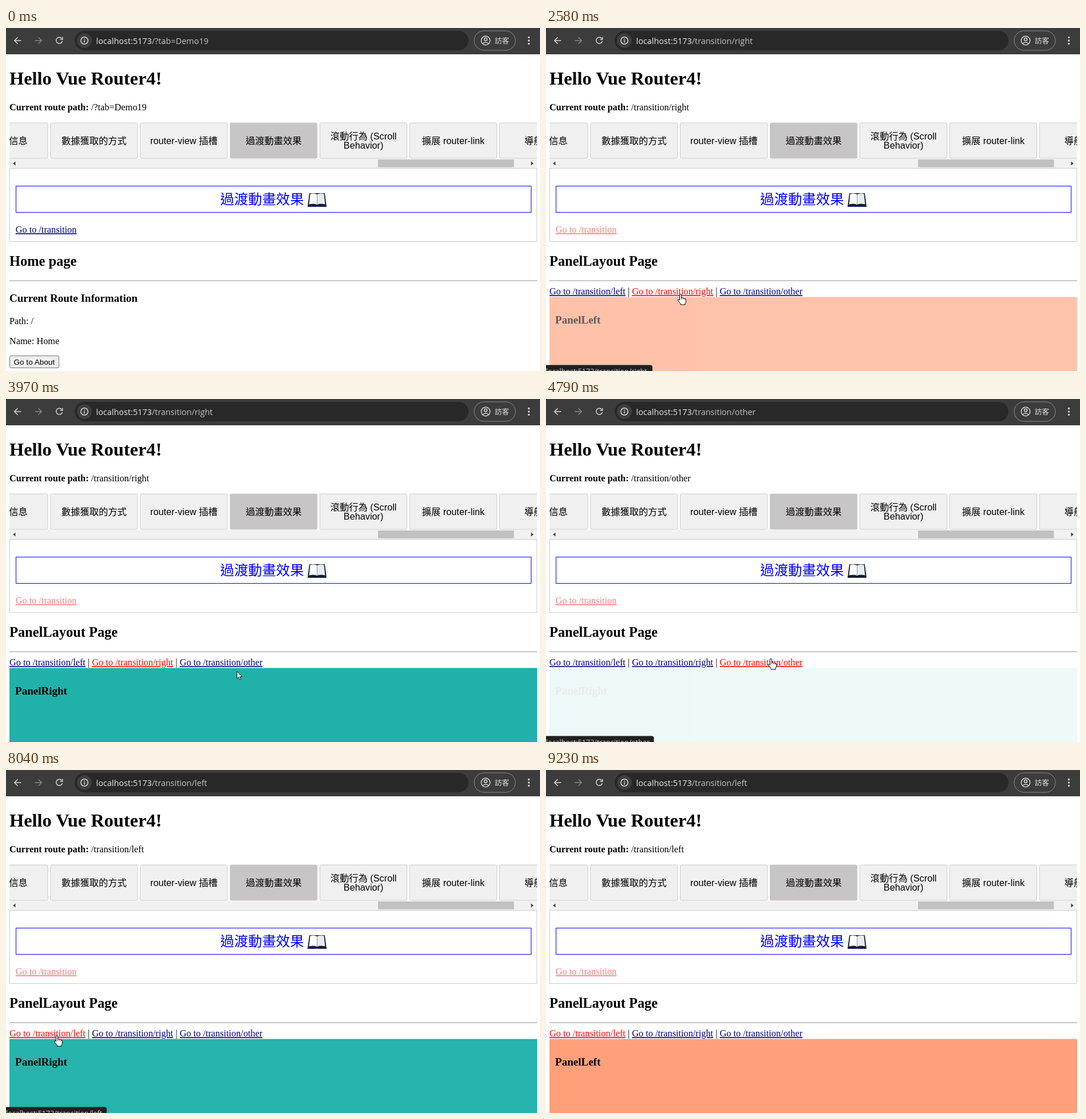
Recreate the animation shown at these times as an HTML page. Size 933 by 600 pixels, loop 9820 ms.

```html
<!DOCTYPE html>
<html lang="zh-Hant">
<head>
<meta charset="utf-8">
<title>Route transitions</title>
<style>
html, body { margin: 0; width: 100%; height: 100%; overflow: hidden; background: #fff; }
svg { display: block; width: 933px; height: 600px; }
text { white-space: pre; }
.serif { font: 16.28px "Liberation Serif", "Times New Roman", serif; }
.h1 { font-size: 32.4px; font-weight: bold; }
.h2 { font-size: 24.42px; font-weight: bold; }
.h3 { font-size: 19.05px; font-weight: bold; }
.b { font-weight: bold; }
.tab { font: 350 16.28px "Liberation Sans", "Noto Sans CJK TC", "Noto Sans CJK", sans-serif; text-anchor: middle; }
.title { font: 500 24.4px "Noto Sans CJK TC", "Noto Sans CJK", sans-serif; fill: #00f; }
.button { font: 13.57px "Liberation Sans", Arial, sans-serif; }
.url { font: 14.43px "Open Sans", "Noto Sans", sans-serif; fill: #e6e6e6; }
.status { font: 12.5px "Open Sans", "Noto Sans", sans-serif; fill: #c8c8c8; }
.guest { font: 12.5px "Noto Sans CJK TC", "Noto Sans CJK", sans-serif; fill: #e3e3e3; }
.link { text-decoration: underline; fill: #000080; }
</style>
</head>
<body>
<svg viewBox="0 0 933 600" xmlns="http://www.w3.org/2000/svg">
  <defs><clipPath id="strip"><rect x="6" y="160" width="922" height="90"/></clipPath></defs>
  <rect width="933" height="600" fill="#fff"/>

  <!-- browser bar -->
  <rect width="933" height="46" fill="#3c3c3c"/>
  <rect x="120" y="5" width="688" height="34" rx="17" fill="#282828"/>
  <g fill="none" stroke="#d6d6d6" stroke-width="1.5">
    <path d="M26.500 22H15M20.500 16.300L14.800 22L20.500 27.700"/>
    <path d="M50.500 22H62M56.500 16.300L62.200 22L56.500 27.700" stroke="#858585"/>
    <path d="M97.400 18.400A5.400 5.400 0 1 0 98.400 22.800M98.700 15.800V19.900H94.500"/>
    <circle cx="137" cy="22" r="13" fill="#3e3e3e" stroke="none"/>
    <circle cx="137" cy="22" r="6.200"/>
    <path d="M137 21.200V25.500M137 18.400V20"/>
    <rect x="818" y="5" width="72" height="34" rx="17" stroke="#8b8b8b" stroke-width="1"/>
    <circle cx="838" cy="22" r="7.700"/>
    <circle cx="838" cy="19.800" r="2.500"/>
    <path d="M832.700 27.300Q838 22.700 843.300 27.300"/>
  </g>
  <text class="guest" x="854" y="27.300">訪客</text>
  <g fill="#d6d6d6"><circle cx="913.500" cy="16.500" r="1.700"/><circle cx="913.500" cy="22" r="1.700"/><circle cx="913.500" cy="27.500" r="1.700"/></g>
  <text class="url" x="157.500" y="27.500">localhost:5173<tspan id="url" fill="#c4c4c4"></tspan></text>

  <!-- page head -->
  <text class="serif h1" x="6" y="98.800">Hello Vue Router4!</text>
  <text class="serif b" x="6" y="143.500">Current route path:</text>
  <text class="serif" id="path" x="148.800" y="143.500"></text>

  <g id="tabs" clip-path="url(#strip)"></g>
  <rect x="6" y="229" width="922" height="16.500" fill="#f1f1f1"/>
  <rect x="650" y="230" width="237.500" height="13.700" fill="#c1c1c1"/>
  <path d="M16.500 233.500V240.500L12 237ZM917.300 233.500V240.500L921.800 237Z" fill="#454545"/>

  <rect x="6.500" y="245.500" width="921" height="128" fill="none" stroke="#ccc"/>
  <rect x="17.500" y="276.500" width="900" height="46" fill="none" stroke="#00f"/>
  <text class="title" x="374.300" y="307.500">過渡動畫效果</text>
  <g>
    <path d="M530 289H557L560 312H527Z" fill="#14202c"/>
    <path d="M531.500 290Q539 288.500 543.500 291V309Q538 306.500 529.500 308.500Z" fill="#fff"/>
    <path d="M555.500 290Q548 288.500 543.500 291V309Q549 306.500 557.500 308.500Z" fill="#e6ecf0"/>
    <path d="M543.500 291V309" stroke="#8d98a0"/>
    <path d="M527 312H560" stroke="#0a0a50" stroke-width="1.500"/>
  </g>
  <text class="serif link" id="enter" x="16.700" y="358">Go to /transition</text>

  <text class="serif h2" id="heading" x="6" y="415.800"></text>
  <rect x="6" y="441.500" width="922" height="1" fill="#8f8f8f"/>

  <g id="home">
    <text class="serif h3" x="6" y="479.300">Current Route Information</text>
    <text class="serif" x="6" y="517.800">Path: /</text>
    <text class="serif" x="6" y="552.800">Name: Home</text>
    <rect x="6.500" y="573.500" width="86" height="21" rx="2.500" fill="#efefef" stroke="#767676"/>
    <text class="button" x="13.500" y="588.700">Go to About</text>
  </g>

  <g id="layout">
    <text class="serif" id="links" x="6" y="466.200"></text>
    <g id="panel">
      <rect id="fill" x="6" y="470.500" width="922" height="130"/>
      <text class="serif h3" id="name" x="16" y="517.300"></text>
    </g>
  </g>

  <g id="status">
    <path id="bubble" fill="#202020"/>
    <text class="status" id="target" x="0" y="605"></text>
  </g>

  <g id="cursor" stroke="#000" fill="#fff" stroke-linejoin="round">
    <path id="arrow" stroke-width="0.900" d="M0.500 0.500V13.200L3.400 10.500L5.300 15.200L7.400 14.300L5.500 9.800H9.500Z"/>
    <g id="hand" stroke-width="1">
      <path d="M-1.500 1.800Q-1.500 0.300 0 0.300T1.500 1.800V7Q3.400 5.800 4.400 7.500Q6.400 6.600 7.200 8.400Q9.500 8 9.500 10.400V13Q9.500 15.400 8 17V19H0.300V17.400Q-1.500 15.600 -4.300 11.500Q-4.800 9.500 -3 9.700L-1.500 11.200Z"/>
      <path d="M1.500 7V10M4.400 7.500V10M7.200 8.400V10.500" fill="none" stroke-width="0.800"/>
    </g>
  </g>
</svg>
<script>
const LOOP = 9820, FADE = 500;
const $ = id => document.getElementById(id);

// [click time, view]
const visits = [[1000, ''], [1640, 'left'], [2467, 'right'], [4457, 'other'], [6787, 'right'], [8018, 'left']];
const panels = {
  left: ['PanelLeft', '#ffa07a'],
  right: ['PanelRight', '#20b2aa'],
  other: ['PanelOther', '#ffffe0']
};
// [time, x, y] of the pointer tip
const route = [
  [260, 43, 468], [590, 43, 468], [850, 66, 350], [1250, 66, 350], [1530, 84, 460],
  [2100, 84, 460], [2350, 235, 465], [3690, 235, 465], [3900, 403, 476], [4130, 403, 476],
  [4330, 393, 454], [5150, 393, 454], [5450, 567, 355], [6070, 567, 355], [6700, 219, 455],
  [7780, 219, 455], [7970, 89, 464], [8640, 89, 464], [9150, 840, 590], [9225, 843, 602]
];
// [from, to, hovered view]
const hovers = [
  [800, 1440, ''], [1440, 2230, 'left'], [2230, 3790, 'right'],
  [4270, 5300, 'other'], [6740, 7930, 'right'], [7930, 8780, 'left']
];
const widths = { '': 144, left: 176, right: 186, other: 188.500 };

const clamp = v => Math.min(1, Math.max(0, v));
const smooth = v => v * v * (3 - 2 * v);
const address = view => '/transition' + (view && '/' + view);

// CSS "ease"
function ease(x) {
  if (x <= 0 || x >= 1) return clamp(x);
  let lo = 0, hi = 1, u = 0.5;
  for (let i = 0; i < 20; i++) {
    u = (lo + hi) / 2;
    const bx = 0.75 * u * (1 - u) + u * u * u;
    if (bx < x) lo = u; else hi = u;
  }
  return 0.3 * u * (1 - u) ** 2 + 3 * u * u * (1 - u) + u ** 3;
}

const labels = [['路由元信息'], ['數據獲取的方式'], ['router-view 插槽'], ['過渡動畫效果'],
  ['滾動行為 (Scroll', 'Behavior)'], ['擴展 router-link'], ['導航故障']];
$('tabs').innerHTML = labels.map((lines, i) => {
  const x = -79.200 + i * 156.900, mid = x + 76.200;
  const y = lines.length > 1 ? 194.700 : 203;
  return `<rect x="${x}" y="166" width="152.200" height="62" rx="2" fill="${i === 3 ? '#c7c5c5' : '#f0f0f0'}" stroke="#ccc"/>` +
    lines.map((s, k) => `<text class="tab" x="${mid}" y="${y + k * 16.500}">${s}</text>`).join('');
}).join('');

$('links').innerHTML = ['left', 'right', 'other']
  .map(v => `<tspan class="link" id="to-${v}">Go to ${address(v)}</tspan>`).join(' | ');

const show = (id, on) => { $(id).style.display = on ? '' : 'none'; };
function write(id, s) { if ($(id).textContent !== s) $(id).textContent = s; }

function drawPage(t) {
  const n = visits.filter(v => v[0] <= t).length - 1;
  const home = n < 0, view = home ? null : visits[n][1];
  const path = home ? '/?tab=Demo19' : address(view);
  write('url', path);
  write('path', path);
  write('heading', home ? 'Home page' : 'PanelLayout Page');
  show('home', home);
  show('layout', !home);
  $('enter').style.fill = home ? '' : view ? '#f08080' : '#f00';
  for (const v in panels) $('to-' + v).style.fill = v === view ? '#f00' : '';

  // the old panel leaves before the new one enters
  let shown = view, alpha = 0;
  if (view) {
    const age = t - visits[n][0], old = visits[n - 1][1];
    if (old && age < FADE) {
      shown = old;
      alpha = 1 - ease(age / FADE);
    } else {
      alpha = ease((age - (old ? FADE : 0)) / FADE);
    }
    write('name', panels[shown][0]);
    $('fill').setAttribute('fill', panels[shown][1]);
  }
  $('panel').setAttribute('opacity', alpha);
}

function drawStatus(t) {
  const i = hovers.findIndex(h => t >= h[0] && t < h[1]);
  show('status', i >= 0);
  if (i < 0) return;
  const [from, to, view] = hovers[i];
  const joinsPrev = i > 0 && hovers[i - 1][1] === from;
  const joinsNext = i + 1 < hovers.length && hovers[i + 1][0] === to;
  const fadeIn = joinsPrev ? 1 : clamp((t - from) / 115);
  const fadeOut = joinsNext ? 1 : clamp((to - t) / 150);
  const w = widths[view];
  $('bubble').setAttribute('d', `M0 589.500H${w - 4}Q${w} 589.500 ${w} 593.500V600H0Z`);
  write('target', 'localhost:5173' + address(view));
  $('status').setAttribute('opacity', Math.min(fadeIn, fadeOut));
}

function drawCursor(t) {
  const i = route.findIndex(k => k[0] > t);
  show('cursor', i > 0);
  if (i < 1) return;
  const [t0, x0, y0] = route[i - 1], [t1, x1, y1] = route[i];
  const p = smooth((t - t0) / (t1 - t0));
  const x = x0 + (x1 - x0) * p, y = y0 + (y1 - y0) * p;
  const onEnter = x > 16 && x < 124 && y > 343 && y < 362;
  const onLinks = t > visits[0][0] && y > 452 && y < 470 &&
    ((x > 6 && x < 139) || (x > 150 && x < 293) || (x > 304 && x < 449));
  show('hand', onEnter || onLinks);
  show('arrow', !(onEnter || onLinks));
  $('cursor').setAttribute('transform', `translate(${x} ${y})`);
}

function frame() {
  const t = performance.now() % LOOP;
  drawPage(t);
  drawStatus(t);
  drawCursor(t);
  requestAnimationFrame(frame);
}
frame();
</script>
</body>
</html>
```
